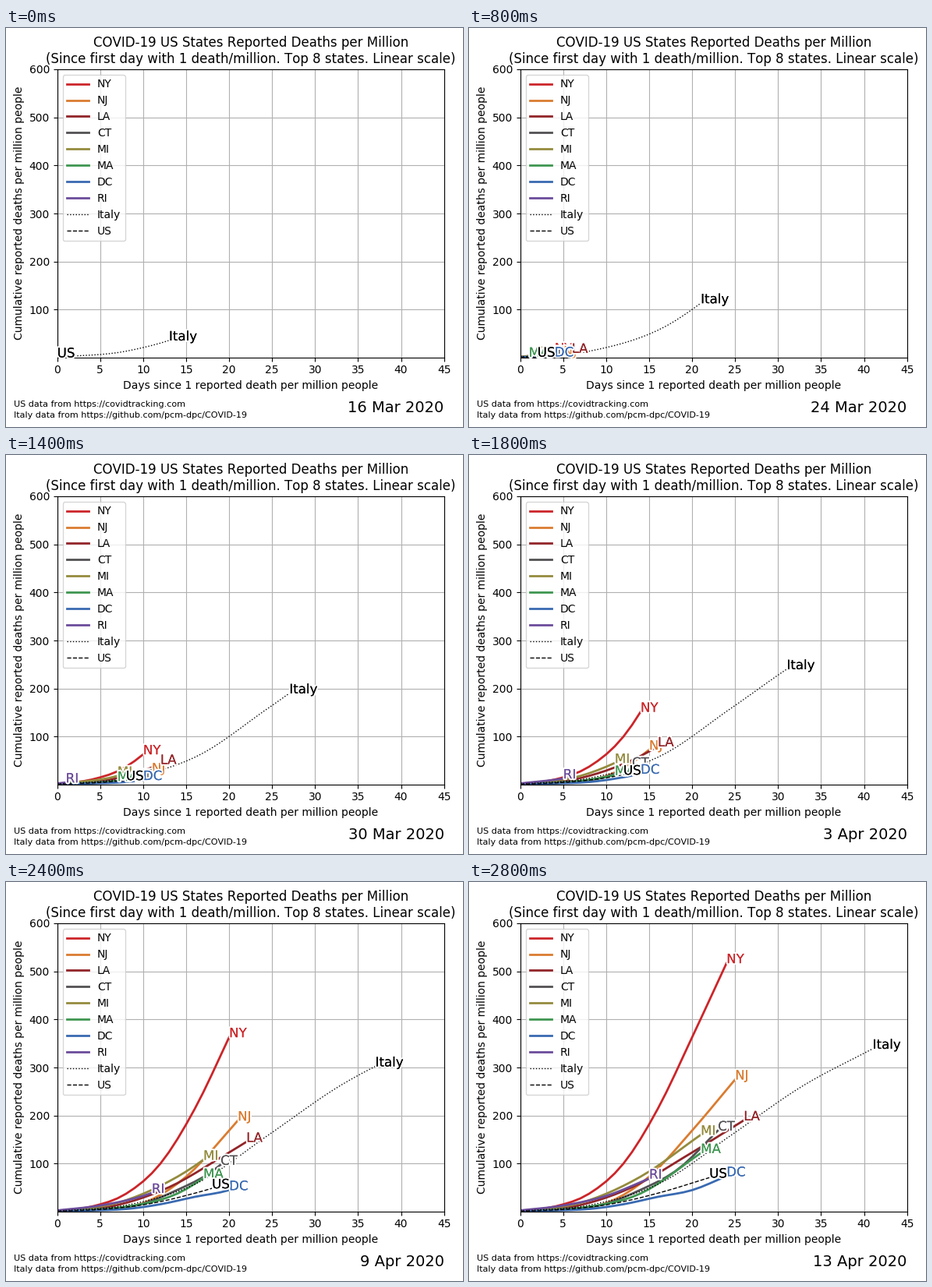
Write a matplotlib script that moves like this. It is 586x512 px and loops after 5.3 s.

```python
import matplotlib.pyplot as plt
import numpy as np
from matplotlib.animation import FuncAnimation
from matplotlib.patheffects import Normal, withStroke

W, H, DPI = 586, 512, 100
LAST_DAY = 28          # days shown after 16 March
HOLD = 25              # ticks the finished chart stays, first one included
plt.rcParams.update({"font.family": "DejaVu Sans", "text.kerning_factor": 6})


def smooth(keys, last):
    """Daily values on a cubic curve through keys spread evenly over 0..last."""
    y = np.array(keys)
    step = last / (len(y) - 1)
    slope = np.gradient(y)
    pos = np.arange(last + 1) / step
    i = np.minimum(pos.astype(int), len(y) - 2)
    t = pos - i
    ease = t * t * (3 - 2 * t)
    return (y[i] + (y[i + 1] - y[i]) * ease
            + t * (1 - t) * ((1 - t) * slope[i] - t * slope[i + 1]))


class Series:
    """One curve with a name tag that rides on its newest point."""

    def __init__(self, ax, name, color, style, start, *keys):
        self.start = start
        self.rates = smooth(keys, LAST_DAY - start)
        self.line, = ax.plot([], [], style, color=color, label=name,
                             lw=2 if style == "-" else 1)
        halo = withStroke(linewidth=3, foreground="white")
        self.tag = ax.text(0, 0, name, color=color, fontsize=12,
                           path_effects=[halo, Normal()])

    def show(self, day, always=False):
        age = day - self.start
        rates = self.rates[:max(age + 1, 0)]
        self.line.set_data(np.arange(len(rates)), rates)
        self.tag.set_visible(always or age >= 0)
        self.tag.set_position((max(age, 0), rates[-1] if len(rates) else 1))


fig = plt.figure(figsize=(W / DPI, H / DPI), dpi=DPI, facecolor="white")
ax = fig.add_axes([65.67 / W, 89.46 / H, 496 / W, 369.6 / H])
ax.set(xlim=(0, 45), ylim=(1, 600), xticks=range(0, 46, 5), yticks=range(100, 601, 100),
       xlabel="Days since 1 reported death per million people",
       ylabel="Cumulative reported deaths per million people")
ax.set_title("COVID-19 US States Reported Deaths per Million\n"
             "(Since first day with 1 death/million. Top 8 states. Linear scale)", fontsize=12)
ax.grid(True)

# Name, colour, line style, first day, then key heights from first to last day.
series = [Series(ax, *spec) for spec in (
    ("NY", "#cc2529", "-", 4, 1.8, 10.8, 37.4, 100, 214, 363, 517),
    ("NJ", "#da7c30", "-", 3, 1, 5, 18, 73, 169, 275),
    ("LA", "#922428", "-", 2, 1.3, 12, 51, 118, 190),
    ("CT", "#535154", "-", 5, 1.1, 5.7, 13, 44, 89, 169),
    ("MI", "#948b3d", "-", 7, 1.5, 18.4, 73, 160),
    ("MA", "#3e9651", "-", 7, 1.3, 8, 38, 122),
    ("DC", "#396ab1", "-", 4, 1.4, 2.8, 5.7, 15.6, 31, 45, 74),
    ("RI", "#6b4c9a", "-", 13, 2.8, 13, 33, 69),
    ("Italy", "black", ":", -13, 1.3, 14.3, 60.6, 160, 261, 339),
    ("US", "black", "--", 6, 1.2, 5.3, 17.6, 41, 71),
)]
ax.legend(loc="upper left", fontsize=10)


def note(x, y, text, size, **kw):
    return fig.text(x / W, 1 - y / H, text, fontsize=size, **kw)


note(10, 486, "US data from https://covidtracking.com", 8)
note(10, 500, "Italy data from https://github.com/pcm-dpc/COVID-19", 8)
date = note(561.67, 493, "", 14, ha="right")


def update(tick):
    day = min(tick, LAST_DAY)
    for s in series:
        s.show(day, always=s is series[-1])
    date.set_text(f"{16 + day} Mar 2020" if day < 16 else f"{day - 15} Apr 2020")


anim = FuncAnimation(fig, update, frames=LAST_DAY + HOLD, interval=100, repeat=True,
                     repeat_delay=0, init_func=lambda: update(0))
plt.show()
```
